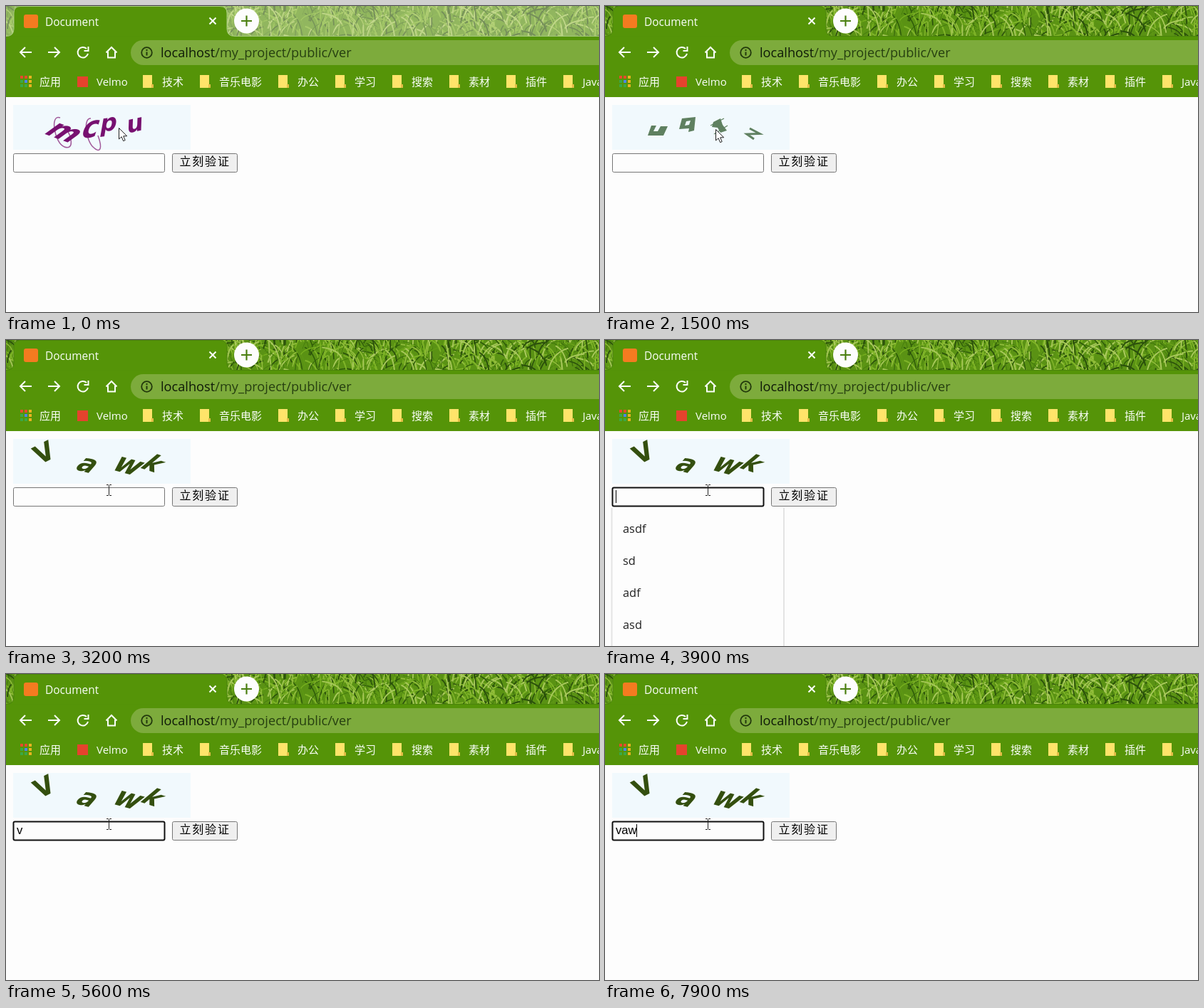
An HTML page for the animation above (8000 ms loop, 832 px wide and 430 px high).

```html
<!DOCTYPE html>
<html lang="zh-CN">
<head>
<meta charset="utf-8">
<title>Document</title>
<style>
html, body { margin: 0; width: 100%; height: 100%; overflow: hidden; background: #fdfdfd; }
svg { display: block; width: 832px; height: 430px; }
text { font-family: "Open Sans", "Noto Sans CJK SC", "Noto Sans CJK", sans-serif; white-space: pre; }
.icon { fill: none; stroke: #fbfffa; stroke-width: 2; }
.bookmark { font-size: 15px; fill: #fbfffa; }
.glyph { font-family: "DejaVu Sans", sans-serif; font-weight: bold; text-anchor: middle; }
#typed { font: 16.67px "Liberation Sans", Arial, sans-serif; }
#button { font: 300 16px "Noto Sans CJK SC", "Noto Sans CJK", sans-serif; letter-spacing: 1.8px; }
#options text { font-size: 16.4px; fill: #222; }
</style>
</head>
<body>
<svg viewBox="0 0 832 430">
  <rect width="832" height="430" fill="#fdfdfd"/>
  <rect width="832" height="43" fill="#5a9214"/>
  <g id="grass" fill="none"></g>
  <rect id="haze" width="832" height="43" fill="#e4ebcf" opacity=".4"/>
  <rect y="42" width="832" height="86" fill="#559408"/>
  <path id="tab" d="M-2 42.5H0Q11 42.5 11 32V10Q11 .5 20 .5H300Q310 .5 310 10V32Q310 42.5 321 42.5H834" fill="#559408"/>

  <rect x="25" y="12" width="20" height="19" rx="3" fill="#f47b20"/>
  <text x="55" y="28" font-size="15.4" fill="#fbfffa">Document</text>
  <path class="icon" d="M285.500 16.500l9 9m0-9l-9 9"/>
  <circle cx="337.500" cy="21" r="17.500" fill="#fdfdfd"/>
  <path d="M330 21h15M337.500 13.500v15" stroke="#4a7f10" stroke-width="2.200"/>

  <path class="icon" d="M36 65H20m7-7l-7 7 7 7M59 65h16m-7-7l7 7-7 7M113 60a7.300 7.300 0 1 0 2 7M115.500 57v6h-6M140.500 65.500l7.500-7.500 7.500 7.500M143 64v8.500h10V64"/>
  <path d="M832 48H192.500a17.500 17.500 0 0 0 0 35H832Z" fill="#7dab3c"/>
  <circle cx="197.500" cy="65.500" r="7.300" fill="none" stroke="#22380c" stroke-width="1.800"/>
  <path d="M197.500 64.500v5m0-8.500v2" stroke="#22380c" stroke-width="2"/>
  <text x="217" y="72" font-size="18.2" fill="#0f1a08">localhost<tspan fill="#263f10">/my_project/public/ver</tspan></text>

  <g id="bookmarks">
    <text class="bookmark" x="47" y="112">应用</text>
    <rect x="100" y="99" width="15" height="15" fill="#e5432d"/>
    <text class="bookmark" x="127" y="112">Velmo</text>
  </g>

  <rect x="10" y="139" width="249" height="63" fill="#f1f9fd"/>
  <g class="captcha" fill="#771070">
    <path d="M76 157C61 151 68 193 82 198S92 183 85 174M119 158C108 157 112 188 122 198S136 201 129 182" fill="none" stroke="#a0589a" stroke-width="1.500"/>
  </g>
  <g class="captcha" fill="#5f8060">
    <path d="M65 168h7l-4 8h6l4-7h10l-6 13H60zM108 158l19-2-2 19-8 2 1-5-14 1zM114 162l-2 6 6-1 2-6z" fill-rule="evenodd"/>
    <path d="M152 163l10-5 3 9 6 8-9 3-4-7-8-1z"/>
    <path d="M148 168l19-10M153 180l19-12" stroke="#5f8060" stroke-width="1.300"/>
    <path d="M203 172l14 7.500-18 .5 10 7" fill="none" stroke="#5f8060" stroke-width="3" stroke-miterlimit="8"/>
  </g>
  <g class="captcha" fill="#344f0f"></g>

  <rect id="field" x="10.500" y="207.500" width="212" height="26" rx="2" fill="#fdfdfd"/>
  <text id="typed" x="15" y="225"></text>
  <rect id="caret" y="211" width="1" height="18"/>
  <rect x="233.500" y="207.500" width="91" height="26" rx="2" fill="#efefef" stroke="#767676"/>
  <text id="button" x="243.500" y="224">立刻验证</text>
  <g id="options">
    <rect x="9" y="236" width="242" height="200" fill="#fdfdfd"/>
    <path d="M9.500 236V430M251 236V430" stroke="#e4e4e4" stroke-width="2"/>
  </g>
  <path id="arrow" d="M.5 .5V16l3.600-3.300 2.500 6 2.600-1.100-2.500-5.800h5z" fill="#fff" stroke="#222"/>
  <path id="beam" d="M-3.500-7.500H-1L0-6.500 1-7.500H3.500M0-6.500V6.500M-3.500 7.500H-1L0 6.500 1 7.500H3.500" fill="none" stroke="#222"/>
</svg>
<script>
const $ = id => document.getElementById(id);
const captchas = [...document.querySelectorAll('.captcha')];

function add(parent, tag, attrs, text = '') {
  const el = document.createElementNS('http://www.w3.org/2000/svg', tag);
  for (const key in attrs) el.setAttribute(key, attrs[key]);
  el.textContent = text;
  parent.append(el);
}

function random(seed) {
  return () => (seed = seed * 16807 % 2147483647) / 2147483647;
}

function growGrass() {
  const rnd = random(731);
  const tones = ['#2f5c0a', '#78b020', '#477e0e', '#92bd3c', '#5f9a14', '#2b500c', '#7fb428', '#a9c95c'];
  for (let layer = 0; layer < 24; layer++) {
    let d = '';
    for (let i = 0; i < 45; i++) {
      const x = rnd() * 850, y = rnd() * 58;
      const dx = (rnd() - .5) * 58, dy = -8 - rnd() * 28;
      d += `M${x.toFixed(1)} ${y.toFixed(1)}q${(dx * .2).toFixed(1)} ${(dy * .8).toFixed(1)} ${dx.toFixed(1)} ${dy.toFixed(1)}`;
    }
    add($('grass'), 'path', { d, stroke: tones[layer % 8], 'stroke-width': .9 + rnd() * 1.2 });
  }
}

function addBookmarks() {
  const colors = ['#e54b2c', '#e54b2c', '#e9b420', '#3ba846', '#4d86e8', '#e9b420', '#3ba846', '#3ba846', '#e9b420'];
  colors.forEach((fill, i) => add($('bookmarks'), 'rect',
    { x: 20 + i % 3 * 6, y: 98 + Math.floor(i / 3) * 6, width: 4, height: 4, fill }));
  const names = ['技术', '音乐电影', '办公', '学习', '搜索', '素材', '插件', 'JavaScript'];
  names.forEach((name, i) => {
    const x = 192 + i * 80 + (i > 1 ? 30 : 0);
    add($('bookmarks'), 'path', { d: `M${x} 97h13v13h2v5H${x}z`, fill: '#ffe46a' });
    add($('bookmarks'), 'path', { d: `M${x + 12} 110v5h3v-5z`, fill: '#e3bd46' });
    add($('bookmarks'), 'text', { class: 'bookmark', x: x + 27, y: 112 }, name);
  });
}

function glyph(parent, char, x, y, size, turn, skew) {
  add(parent, 'text', {
    class: 'glyph', 'font-size': size, y: size * (char === 'V' || char === 'k' ? .365 : .28),
    transform: `translate(${x} ${y}) rotate(${turn}) skewX(${skew})`
  }, char);
}

growGrass();
addBookmarks();
[['m', 81, 178, 39, 20, -34], ['c', 119, 173, 40, -10, -28], ['p', 144, 166, 33, -8, -18], ['u', 181, 167, 33, -12, -14]]
  .forEach(g => glyph(captchas[0], ...g));
[['V', 53, 158, 36, -27, 0], ['a', 114, 176, 36, 15, -26], ['w', 171, 177, 39, 15, -26], ['k', 208, 173, 34, 18, -32]]
  .forEach(g => glyph(captchas[2], ...g));
['asdf', 'sd', 'adf', 'asd'].forEach((word, i) => add($('options'), 'text', { x: 25, y: 271 + i * 45 }, word));

const show = (el, on) => el.setAttribute('display', on ? 'inline' : 'none');
const ease = (t, from, to) => {
  const p = Math.min(1, Math.max(0, (t - from) / (to - from)));
  return p * p * (3 - 2 * p);
};
const keys = [5000, 6000, 7500];
const focusAt = 3500;

function draw(t) {
  const active = t >= 300, focused = t >= focusAt;
  show($('haze'), !active);
  $('tab').setAttribute('stroke', active ? '#4a820c' : '#a5c97c');

  const current = t < 1100 ? 0 : t < 2300 ? 1 : 2;
  captchas.forEach((el, i) => show(el, i === current));

  const count = keys.filter(k => t >= k).length;
  const typed = 'vaw'.slice(0, count);
  if ($('typed').textContent !== typed) $('typed').textContent = typed;
  $('field').setAttribute('stroke', focused ? '#101010' : '#767676');
  $('field').setAttribute('stroke-width', focused ? 2 : 1);
  const lastInput = count ? keys[count - 1] : focusAt;
  show($('caret'), focused && (t - lastInput) % 1000 < 500);
  $('caret').setAttribute('x', 15 + (count ? Math.round($('typed').getComputedTextLength()) - 1 : 0));
  show($('options'), focused && !count);

  const drift = ease(t, 100, 500), settle = ease(t, 700, 1100), move = ease(t, 2750, 3100);
  const x = 158 - 2 * drift - settle - 11 * move;
  const y = 171 + 2 * drift + 38 * move;
  const overField = y >= 207;
  show($('arrow'), !overField);
  show($('beam'), overField);
  $(overField ? 'beam' : 'arrow').setAttribute('transform', `translate(${x + (overField ? .5 : 0)} ${y})`);
}

const start = performance.now();
function tick() {
  draw((performance.now() - start) % 8000);
  requestAnimationFrame(tick);
}
draw(0);
requestAnimationFrame(tick);
</script>
</body>
</html>
```
